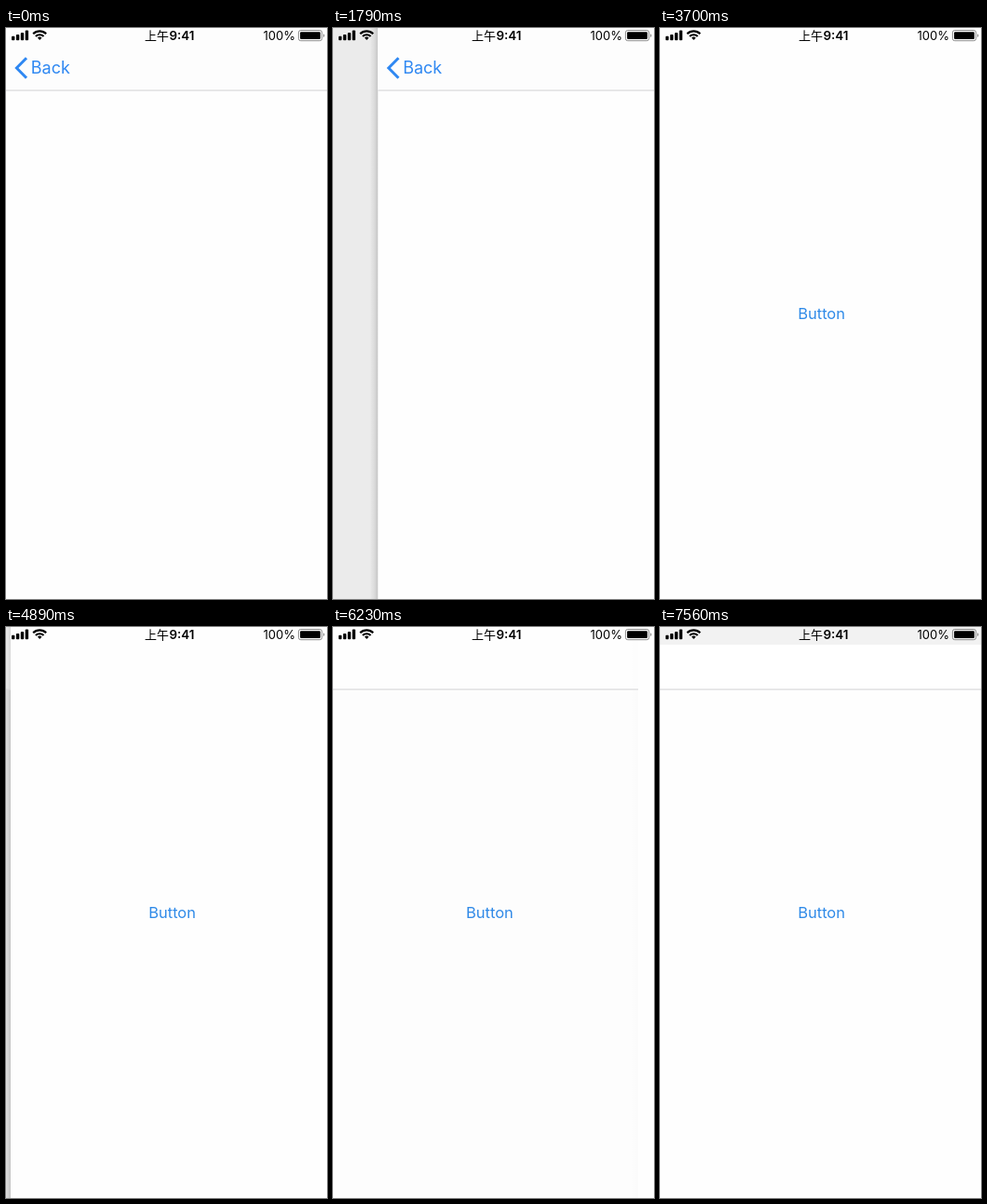
Animation of 345 by 614 pixels, one loop 8260 ms. Source, as an HTML page:

```html
<!DOCTYPE html>
<html lang="en">
<head>
<meta charset="utf-8">
<title>Swipe back</title>
<style>
  html, body { margin: 0; width: 100%; height: 100%; overflow: hidden; background: #fefefe; }
  svg { display: block; width: 100%; height: 100%; }
  text { font-family: Inter, Roboto, sans-serif; }
  .btn { font-size: 16.5px; fill: #2f8ae8; }
  .back { font-size: 18px; fill: #2f88f2; }
  .hair { fill: #dadadc; }
  .status { font-size: 13px; fill: #000; }
  .cjk { font-family: "Noto Sans CJK SC", "Noto Sans CJK", sans-serif; font-weight: 500; }
  #cursor { filter: drop-shadow(0 1px 1px rgba(0, 0, 0, .35)); }
</style>
</head>
<body>
<svg viewBox="0 0 345 614" preserveAspectRatio="none">
  <defs>
    <linearGradient id="fade">
      <stop offset="0" stop-color="#000" stop-opacity="0"/>
      <stop offset=".5" stop-color="#000" stop-opacity=".06"/>
      <stop offset="1" stop-color="#000" stop-opacity=".16"/>
    </linearGradient>
  </defs>

  <rect width="345" height="614" fill="#fefefe"/>
  <g id="under"><text class="btn" x="148.2" y="312.8">Button</text></g>
  <rect id="dim" width="345" height="614"/>
  <rect id="shadow" width="9" height="614" fill="url(#fade)"/>
  <g id="underNav">
    <rect width="345" height="67" fill="#fefefe" opacity=".35"/>
    <rect class="hair" y="66.5" width="345" height="1.2"/>
  </g>

  <g id="panel">
    <rect width="345" height="614" fill="#fefefe"/>
    <g id="detail">
      <rect width="345" height="67" fill="#fdfdfd"/>
      <rect class="hair" y="66.5" width="345" height="1.2"/>
      <path d="M22 32.2 11.4 43 22 53.8" fill="none" stroke="#2f88f2" stroke-width="3"/>
      <text class="back" x="26.8" y="49.3">Back</text>
    </g>
    <text id="panelBtn" class="btn" x="148.2" y="312.8">Button</text>
  </g>

  <rect id="bar" width="345" height="19" fill="#f2f2f2"/>
  <g class="status">
    <rect x="6" y="8.7" width="3.4" height="4.5" rx="1"/>
    <rect x="10.9" y="7" width="3.4" height="6.2" rx="1"/>
    <rect x="15.8" y="4.9" width="3.4" height="8.3" rx="1"/>
    <rect x="20.7" y="2.6" width="3.4" height="10.6" rx="1"/>
    <g transform="translate(0 -.7)">
      <g fill="none" stroke="#000" stroke-width="2.2">
        <path d="M29.2 7A10 10 0 0 1 43.2 7"/>
        <path d="M31.9 9.7A6.1 6.1 0 0 1 40.5 9.7"/>
      </g>
      <path d="M36.2 13.7 33.9 11.3A3.3 3.3 0 0 1 38.5 11.3Z"/>
    </g>
    <text class="cjk" x="149" y="13">上午</text>
    <text x="175.4" y="13" font-size="13.4" font-weight="600">9:41</text>
    <text x="276.5" y="13">100%</text>
    <rect x="314.4" y="2.5" width="25.2" height="11.2" rx="2.4" fill="none" stroke="#8c8c8c"/>
    <rect x="316.1" y="4.2" width="21.8" height="7.8" rx="1"/>
    <path d="M341 6.2A2 2 0 0 1 341 10Z" fill="#8c8c8c"/>
  </g>
  <path id="cursor" d="M0 0V15L3.5 11.8 6 17.5 8.5 16.4 6 10.8H10.6Z" stroke="#fff"/>
</svg>
<script>
const LOOP = 8260, W = 345, PARALLAX = 0.304;
const $ = id => document.getElementById(id);
const show = (id, on) => $(id).setAttribute("display", on ? "inline" : "none");
const move = (id, x, y = 0) => $(id).setAttribute("transform", `translate(${x} ${y})`);

// Panel's left edge as [step, x] keys for each swipe.
const firstSwipe = [[0, 3], [6, 48.4], [7, 52], [12, 112], [15, 133], [16, 190], [17, 295], [18, 336], [19, 345]];
const secondSwipe = [[0, 5], [3, 80], [5, 112], [6, 119.3], [7, 124], [8, 175], [9, 275], [10, 328], [11, 342], [12, 345]];

// Motion advances in held steps; -1 before the start.
function stepAt(t, start, end, last) {
  if (t < start) return -1;
  return Math.min(last, Math.floor((t - start + 6) / ((end - start) / last)));
}

function edgeAt(keys, step) {
  if (step < 0) return 0;
  const i = keys.findIndex(k => k[0] >= step);
  if (i === 0) return keys[0][1];
  const [s0, x0] = keys[i - 1], [s1, x1] = keys[i];
  return x0 + (x1 - x0) * (step - s0) / (s1 - s0);
}

function draw(t) {
  const second = t >= 4750;
  const edge = second
    ? edgeAt(secondSwipe, stepAt(t, 4750, 6520, 12))
    : edgeAt(firstSwipe, stepAt(t, 900, 3700, 19));
  const left = 1 - edge / W;

  move("under", -PARALLAX * (W - edge));
  $("dim").setAttribute("opacity", 0.085 * left);
  $("shadow").setAttribute("opacity", Math.min(1, left * 1.3));
  move("shadow", edge - 9);
  move("panel", edge);
  show("underNav", second);
  show("detail", !second);
  show("panelBtn", second);

  const outro = stepAt(t, 6970, 7560, 4);
  show("cursor", outro === 0 || outro === 1);
  move("cursor", 46.5 - 8 * outro, 565.4 + 24 * outro);
  show("bar", outro >= 3);
}

let start;
function tick(now) {
  start ??= now;
  draw((now - start) % LOOP);
  requestAnimationFrame(tick);
}
draw(0);
requestAnimationFrame(tick);
</script>
</body>
</html>
```
